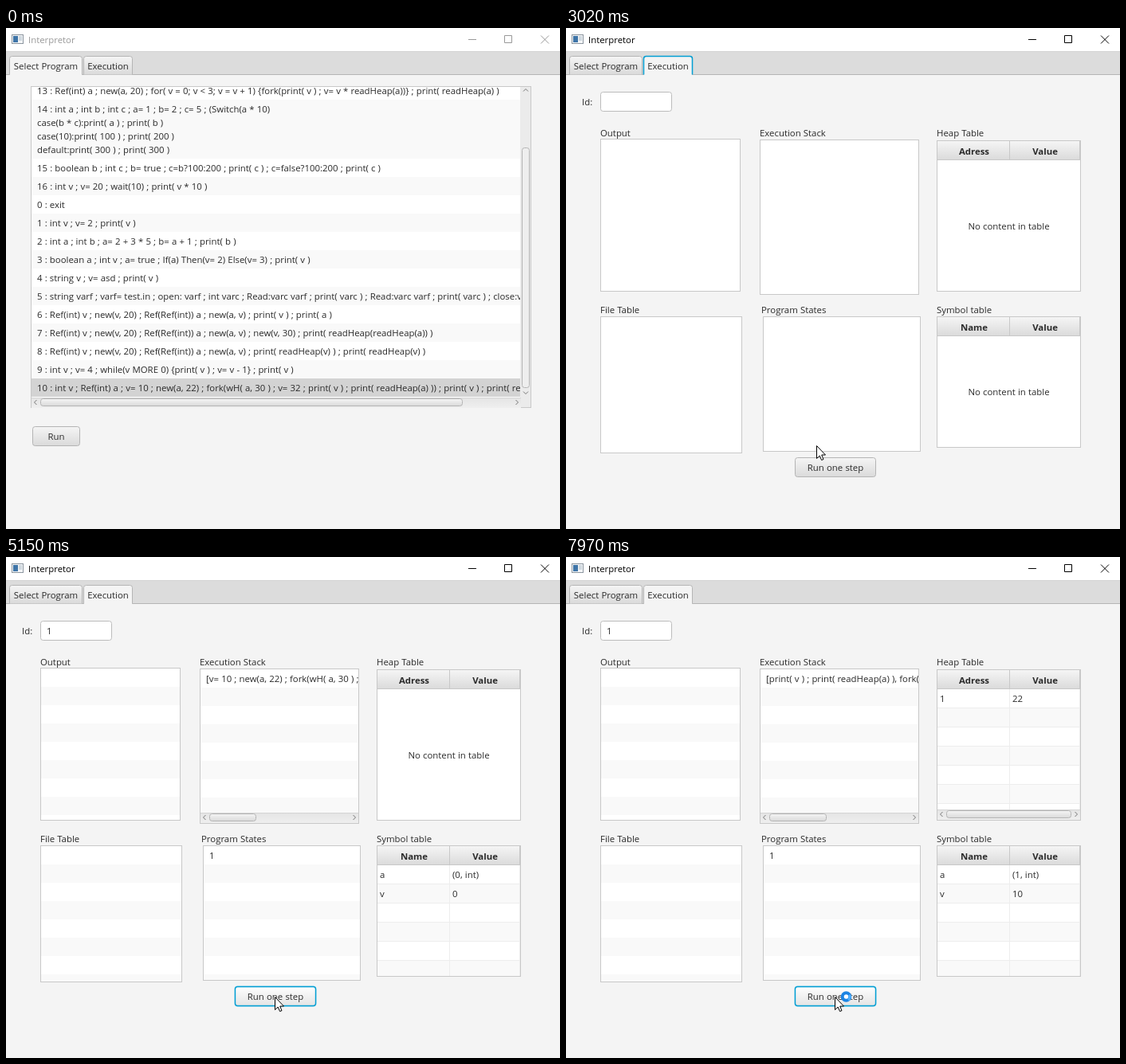
Animation, 695 px wide and 629 px high, one loop 8 s. Source, as an HTML page:

```html
<!DOCTYPE html>
<html lang="en">
<head>
<meta charset="utf-8">
<title>Interpretor</title>
<style>
html, body { margin: 0; height: 100%; overflow: hidden; background: #f4f4f4; }
svg { display: block; width: 695px; height: 629px; }
text { font: 11.4px "Open Sans", "Noto Sans", sans-serif; word-spacing: .2px; fill: #2a2a2a; white-space: pre; }
.b { font-weight: bold; }
.m { text-anchor: middle; }
</style>
</head>
<body>
<svg viewBox="0 0 695 629">
  <defs>
    <linearGradient id="idle" x2="0" y2="1"><stop stop-color="#f5f5f5"/><stop offset="1" stop-color="#dadada"/></linearGradient>
    <linearGradient id="hover" x2="0" y2="1"><stop stop-color="#fefefe"/><stop offset="1" stop-color="#e4e4e4"/></linearGradient>
    <linearGradient id="down" x2="0" y2="1"><stop stop-color="#e2e2e2"/><stop offset="1" stop-color="#c6c6c6"/></linearGradient>
    <linearGradient id="track" x2="0" y2="1"><stop stop-color="#e4e4e4"/><stop offset="1" stop-color="#efefef"/></linearGradient>
    <clipPath id="progClip"><path d="M32 74H645V463H32z"/></clipPath>
    <clipPath id="stackClip"><path d="M244 141H442V321H244z"/></clipPath>
  </defs>
  <g id="scene"></g>
</svg>
<script>
const scene = document.getElementById('scene');
const LOOP = 8000, BLUE = '#039ed3', EDGE = '#c8c8c8';

const stmts = ['int v', 'Ref(int) a', 'v= 10', 'new(a, 22)',
  'fork(wH( a, 30 ) ; v= 32 ; print( v ) ; print( readHeap(a) ))',
  'print( v )', 'print( readHeap(a) )'];

const programs = [
  '13 : Ref(int) a ; new(a, 20) ; for( v = 0; v < 3; v = v + 1) {fork(print( v ) ; v= v * readHeap(a))} ; print( readHeap(a) )',
  '14 : int a ; int b ; int c ; a= 1 ; b= 2 ; c= 5 ; (Switch(a * 10)\ncase(b * c):print( a ) ; print( b )\ncase(10):print( 100 ) ; print( 200 )\ndefault:print( 300 ) ; print( 300 )',
  '15 : boolean b ; int c ; b= true ; c=b?100:200 ; print( c ) ; c=false?100:200 ; print( c )',
  '16 : int v ; v= 20 ; wait(10) ; print( v * 10 )',
  '0 : exit',
  '1 : int v ; v= 2 ; print( v )',
  '2 : int a ; int b ; a= 2 + 3 * 5 ; b= a + 1 ; print( b )',
  '3 : boolean a ; int v ; a= true ; If(a) Then(v= 2) Else(v= 3) ; print( v )',
  '4 : string v ; v= asd ; print( v )',
  '5 : string varf ; varf= test.in ; open: varf ; int varc ; Read:varc varf ; print( varc ) ; Read:varc varf ; print( varc ) ; close:varf',
  '6 : Ref(int) v ; new(v, 20) ; Ref(Ref(int)) a ; new(a, v) ; print( v ) ; print( a )',
  '7 : Ref(int) v ; new(v, 20) ; Ref(Ref(int)) a ; new(a, v) ; new(v, 30) ; print( readHeap(readHeap(a)) )',
  '8 : Ref(int) v ; new(v, 20) ; Ref(Ref(int)) a ; new(a, v) ; print( readHeap(v) ) ; print( readHeap(v) )',
  '9 : int v ; v= 4 ; while(v MORE 0) {print( v ) ; v= v - 1} ; print( v )',
  '10 : ' + stmts.join(' ; ')];

// [press, release] of every mouse click; the first two are Run and the tab
const clicks = [[990, 1070], [2320, 2390], [3440, 3510], [3900, 3980], [4530, 4610], [5070, 5150],
  [5710, 5780], [6170, 6320], [6560, 6640], [7110, 7190], [7660, 7810]];
const busySpans = [[6170, 6710], [7030, 7430], [7660, LOOP]];
const thumbs = [50, 53, 53, 59, 58, 62, 63, 72, 72];

// pointer moves: start, end, steps, first part of the curve, Bezier points
const moves = [
  [140, 680, 8, 0, [440, 604], [250, 600], [80, 515], [70, 509]],
  [830, 830, 1, 1, [70, 509], [70, 509], [68, 509], [68, 509]],
  [1470, 2240, 11, 0, [84, 518], [110, 630], [215, 60], [128, 48]],
  [2620, 3350, 10, .1, [128, 48], [150, 560], [439, 556.5], [337, 552]]];

const within = (t, [a, b]) => t >= a && t < b;
const esc = s => s.replace(/&/g, '&amp;').replace(/</g, '&lt;');
const text = (x, y, s, cls = '', more = '') => `<text x="${x}" y="${y}" class="${cls}" ${more}>${esc(s)}</text>`;
const fill = (x, y, w, h, color, more = '') => `<rect x="${x}" y="${y}" width="${w}" height="${h}" fill="${color}" ${more}/>`;
const box = (x, y, w, h, color = '#fff', edge = EDGE, r = 0, line = 1) =>
  fill(x + .5, y + .5, w - 1, h - 1, color, `stroke="${edge}" stroke-width="${line}" rx="${r}"`);
const stroke = (d, color, w = 1) => `<path d="${d}" fill="none" stroke="${color}" stroke-width="${w}"/>`;

function pointer(t) {
  const move = moves.filter(m => t >= m[0]).pop();
  if (!move) return null;
  const [t0, t1, n, u0, ...pts] = move;
  const gap = (t1 - t0) / (n - 1) || 1;
  const k = Math.min(n - 1, Math.floor((t - t0) / gap + .1));
  const u = n > 1 ? u0 + (1 - u0) * k / (n - 1) : 1, v = 1 - u;
  const at = i => Math.round(v * v * v * pts[0][i] + 3 * v * v * u * pts[1][i] + 3 * v * u * u * pts[2][i] + u * u * u * pts[3][i]);
  return [at(0), at(1)];
}

function button(x, y, w, label, state) {
  const h = 25, over = state.at && state.at[0] >= x && state.at[0] < x + w && state.at[1] >= y && state.at[1] < y + h;
  const skin = over ? state.pressed ? 'down' : 'hover' : 'idle';
  return (state.focus ? box(x - .5, y - .5, w + 1, h + 1, 'none', '#c5e6f1', 4, 2) : '') +
    box(x, y, w, h, `url(#${skin})`, state.focus ? BLUE : '#b4b4b4', 3, state.focus ? 1.4 : 1) +
    text(x + w / 2, y + 17, label, 'm');
}

function hbar(x, y, w, thumbX, thumbW) {
  const m = y + 6, r = x + w - 5.5;
  return fill(x, y, w, 13, 'url(#track)') + stroke(`M${x} ${y + .5}h${w}`, '#d4d4d4') +
    box(thumbX, y + 1, thumbW, 10, 'url(#idle)', '#b4b4b4', 3) +
    stroke(`M${x + 6.5} ${m - 3}l-3 3l3 3M${r - 1} ${m - 3}l3 3l-3 3`, '#777');
}

function tab(x, w, label, on, focus, over) {
  const shape = `M${x + .5} 58.5V38.5q0-3 3-3H${x + w - 3.5}q3 0 3 3V58.5`;
  return `<path d="${shape}" fill="${on ? '#f4f4f4' : over ? 'url(#hover)' : 'url(#idle)'}" stroke="#b5b5b5"/>` +
    (on ? fill(x + 1, 58, w - 2, 1, '#f4f4f4') : '') +
    (focus ? stroke(shape, BLUE, 1.5) : '') + text(x + w / 2, 52, label, 'm');
}

function frame(t, at, onExec, tabFocus) {
  const ink = t < 990 ? '#999' : '#000';
  const overTab = at && at[1] >= 35 && at[1] < 59 && at[0] >= 97 && at[0] < 159;
  return fill(0, 0, 695, 629, '#f4f4f4') + fill(0, 0, 695, 30, '#fff') +
    box(7, 8, 15, 12, '#f4f6f8', '#8c969f') + fill(9, 10, 6, 8, '#3f75a8') + fill(16, 10, 4, 6, '#cfd8df') +
    text(28, 19, 'Interpretor', '', `style="fill:${ink}"`) +
    stroke('M580 14.5h10M625.5 9.5h9v9h-9zM671 9.5l10 10m0-10l-10 10', ink) +
    fill(0, 30, 695, 29, '#dcdcdc') + fill(0, 29, 695, 1, '#d4d4d4') + fill(0, 58, 695, 1, '#b5b5b5') +
    tab(4, 92, 'Select Program', !onExec) + tab(97, 62, 'Execution', onExec, tabFocus, overTab);
}

function selectPage(state) {
  let y = 67, rows = '';
  programs.forEach((p, i) => {
    const lines = p.split('\n'), h = lines.length > 1 ? 74 : 23;
    rows += fill(32, y, 613, h, i == 14 ? '#d3d3d3' : i % 2 ? '#f9f9f9' : '#fff');
    lines.forEach((s, j) => rows += text(39, y + 16 + Math.round(j * 17.1), s));
    y += h;
  });
  return box(31, 73, 628, 404) + `<g clip-path="url(#progClip)">${rows}</g>` +
    fill(645, 74, 13, 402, '#ebebeb') + box(647, 150, 10, 302, '#eee', '#b4b4b4', 3) +
    stroke('M649 79.5l3-3l3 3M649 456.5l3 3l3-3', '#777') +
    hbar(32, 464, 614, 43, 530) + button(33, 500, 60, 'Run', state);
}

function list(x, y, w, h, striped) {
  let s = box(x, y, w, h);
  for (let r = y + 24; striped && r < y + h - 1; r += 46) s += fill(x + 1, r, w - 2, Math.min(23, y + h - 1 - r), '#f9f9f9');
  return s;
}

function table(y, h, name, rows) {
  const top = y + 25, end = y + h - 1;
  let s = box(465, y, 181, h) + fill(466, y + 1, 179, 24, 'url(#idle)') +
    stroke(`M556.5 ${y + 1}v24M644.5 ${y + 1}v24M466 ${top - .5}h179`, EDGE) +
    text(512, y + 18, name, 'b m') + text(601, y + 18, 'Value', 'b m');
  if (!rows.length) return s + text(555.5, y + (h > 180 ? 112 : 99), 'No content in table', 'm');
  for (let i = 0, r = top; r < end; i++, r += 24) {
    const rh = Math.min(24, end - r);
    s += fill(466, r, 179, rh, i % 2 ? '#f9f9f9' : '#fff');
    if (rh == 24) s += fill(466, r + 23, 179, 1, '#ededed');
    if (rows[i]) s += text(469, r + 16, rows[i][0]) + text(560, r + 16, rows[i][1]);
  }
  return s + stroke(`M556.5 ${top}V${end}M644.5 ${top}V${end}`, '#ededed');
}

function execPage(n, state) {
  const live = n > 0, i = Math.ceil(n / 2);
  const stack = `[${stmts.slice(i).join(' ; ')}${n % 2 ? ', ' + stmts[i - 1] : ''}]`;
  const symbols = [];
  if (n > 3) symbols.push(['a', `(${n > 7 ? 1 : 0}, int)`]);
  if (n > 1) symbols.push(['v', n > 5 ? '10' : '0']);
  let s = text(20, 97, 'Id:') + box(43, 80, 90, 25, '#fff', '#bcbcbc', 3) +
    text(43, 136, 'Output') + text(243, 136, 'Execution Stack') + text(465, 136, 'Heap Table') +
    text(43, 358, 'File Table') + text(245, 358, 'Program States') + text(465, 358, 'Symbol table') +
    list(43, 139, 176, 192, live) + list(243, 140, 200, 195, live) +
    list(43, 362, 178, 172, live) + list(247, 362, 198, 170, live) +
    table(141, 190, 'Adress', n > 7 ? [['1', '22']] : []) + table(362, 165, 'Name', symbols);
  if (live) s += text(51, 97, '1') + text(255, 379, '1') +
    `<g clip-path="url(#stackClip)">${text(251, 157, stack)}</g>` + hbar(244, 321, 198, 255, thumbs[n - 1]);
  if (n > 7) s += hbar(466, 317, 179, 477, 157);
  return s + button(287, 539, 102, 'Run one step', state);
}

function cursor([x, y], t, pressed) {
  const busy = busySpans.find(b => within(t, b));
  let s = pressed ? `<circle cx="${x}" cy="${y}" r="11.5" fill="#ffee00" opacity=".6"/>` : '';
  if (busy) {
    const turn = Math.floor((t - busy[0]) / 78) * 50;
    s += `<g transform="translate(${x + 14.5} ${y})"><circle r="4.8" fill="#fff" stroke="#1c84e3" stroke-width="4"/>` +
      `<path d="M-4.8 0A4.8 4.8 0 0 1 0-4.8" fill="none" stroke="#4fb0ff" stroke-width="3" transform="rotate(${turn})"/></g>`;
  }
  return s + `<path transform="translate(${x} ${y})" d="M.5.5V16.5L4.2 13L6.6 18.5L9 17.5L6.7 12H11.5z" fill="#fff" stroke="#000"/>`;
}

function render(t) {
  const at = pointer(t), pressed = clicks.some(c => within(t, c));
  const onExec = t >= clicks[1][1];
  const steps = clicks.slice(2).filter(c => t >= c[1]).length;
  const focus = onExec ? t >= clicks[2][0] : t >= clicks[0][0];
  const state = { at, pressed, focus };
  scene.innerHTML = frame(t, at, onExec, onExec && !focus) +
    (onExec ? execPage(steps, state) : selectPage(state)) + (at ? cursor(at, t, pressed) : '');
}

const start = performance.now();
function tick() {
  render((performance.now() - start) % LOOP);
  requestAnimationFrame(tick);
}
tick();
</script>
</body>
</html>
```
